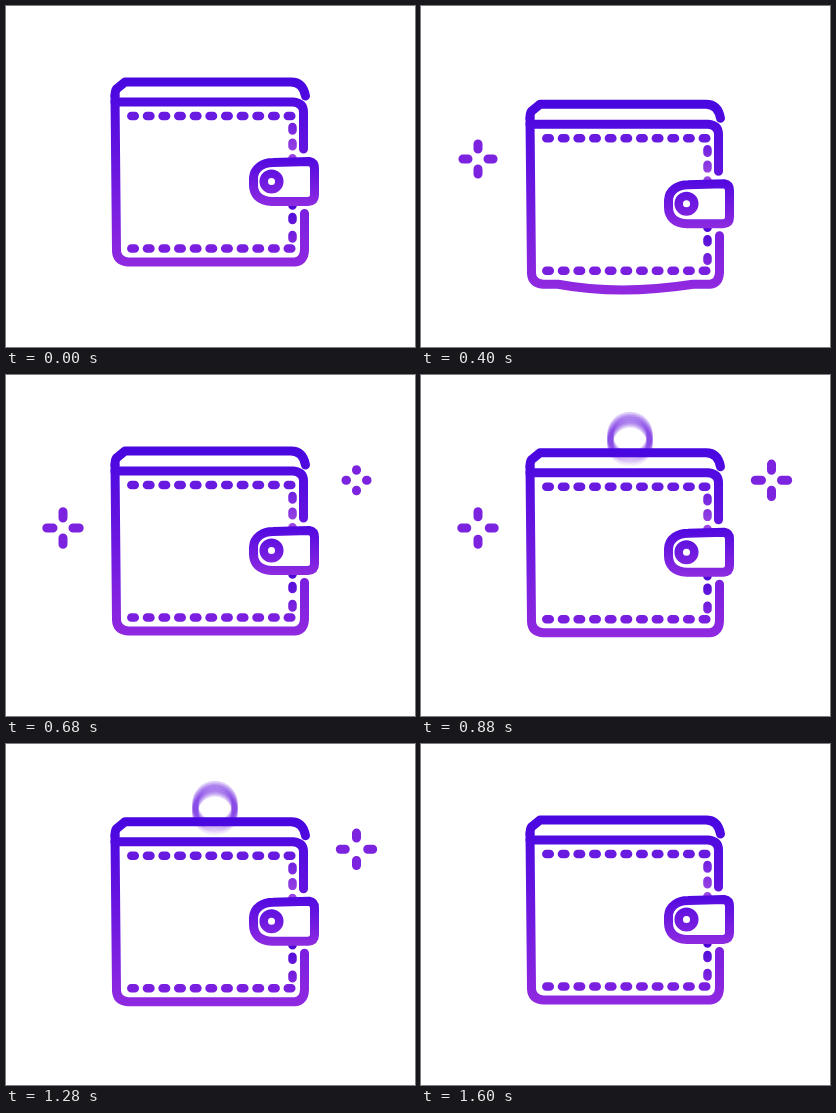
An HTML page that plays this animation: 409 px wide and 341 px high, repeating every 1760 ms.

```html
<!DOCTYPE html>
<html lang="en">
<head>
<meta charset="utf-8">
<title>Wallet</title>
<style>
  html, body { margin: 0; width: 100%; height: 100%; overflow: hidden; background: #fff; }
  svg { display: block; width: 100%; height: 100%; }
</style>
</head>
<body>
<svg viewBox="0 0 409 341" fill="none" stroke-linecap="round" stroke-linejoin="round">
  <defs>
    <linearGradient id="body" gradientUnits="userSpaceOnUse" x1="0" y1="72" x2="0" y2="260">
      <stop offset="0" stop-color="#4806e0"/><stop offset="1" stop-color="#9029e0"/>
    </linearGradient>
    <linearGradient id="clasp" gradientUnits="userSpaceOnUse" x1="0" y1="151" x2="0" y2="200">
      <stop offset="0" stop-color="#5008e0"/><stop offset="1" stop-color="#8e2be0"/>
    </linearGradient>
    <linearGradient id="seamTop" gradientUnits="userSpaceOnUse" x1="0" y1="112" x2="0" y2="148">
      <stop offset="0" stop-color="#6a1ae0"/><stop offset="1" stop-color="#9a46e2"/>
    </linearGradient>
    <linearGradient id="seamLow" gradientUnits="userSpaceOnUse" x1="0" y1="197" x2="0" y2="240">
      <stop offset="0" stop-color="#4505d6"/><stop offset="1" stop-color="#8528e0"/>
    </linearGradient>
    <linearGradient id="fade" gradientUnits="userSpaceOnUse" x1="0" y1="72" x2="0" y2="96">
      <stop offset="0" stop-color="#6a1ce0"/><stop offset="1" stop-color="#9a46e2" stop-opacity="0"/>
    </linearGradient>
  </defs>

  <g id="coin" stroke="url(#fade)" stroke-width="6" stroke-opacity=".2"></g>

  <g id="wallet" stroke="url(#body)" stroke-width="9">
    <path d="M299.500 90Q297 76 285 76H119L110.500 83Q109 85 109 90"/>
    <path d="M109 96H287Q297.500 97 297.500 106V143"/>
    <path id="shell"/>
    <g stroke-width="8.500" stroke-dasharray="3.500 12.150">
      <path stroke="#681ae0" d="M125.300 110H286"/>
      <path stroke="#7a1fe0" d="M125.300 242.500H286"/>
      <path stroke="url(#seamTop)" d="M286.500 121V156"/>
      <path stroke="url(#seamLow)" d="M286.500 196V200M286.500 211V214M286.500 229V233"/>
    </g>
    <path stroke="url(#clasp)" fill="#fff" d="M267 156.500L303 155.500Q308.500 156.500 308.500 162V189Q308.500 195 302 195.500H266C253 195 247.500 188 247.500 179V172C248 162 257 156.500 267 156.500Z"/>
    <circle stroke="url(#clasp)" stroke-width="8.500" cx="265.500" cy="175.500" r="7.800"/>
  </g>

  <path id="leftSpark" stroke="#7c23e0" transform="translate(57 153)"/>
  <path id="rightSpark" stroke="#7c23e0" transform="translate(350.500 105.300)"/>
</svg>
<script>
const LOOP = 1760, STEP = 40, DROPS = [200, 800, 1200], DROP_TIME = 400;
const $ = id => document.getElementById(id);
const ramp = (t, a, b) => Math.min(1, Math.max(0, (t - a) / (b - a)));
const smooth = (t, a, b) => { const u = ramp(t, a, b); return u * u * (3 - 2 * u); };
const pulse = (t, a, b) => Math.sin(Math.PI * ramp(t, a, b)) ** 2;

// Overlapping translucent rings give the falling coin its motion blur.
const rings = Array.from({ length: 7 }, () => {
  const ring = document.createElementNS('http://www.w3.org/2000/svg', 'circle');
  ring.setAttribute('cx', 209);
  ring.setAttribute('r', 19.8);
  return $('coin').appendChild(ring);
});

function drawSpark(el, t) {
  const inner = 10 + 6.2 * smooth(t, 800, 1080);
  const outer = Math.max(inner + .01, 10 + 6.2 * smooth(t, 240, 460));
  const width = 9 * ramp(t, 200, 270) * (1 - ramp(t, 1040, 1100));
  el.style.display = width > 0 ? '' : 'none';
  el.setAttribute('stroke-width', width);
  el.setAttribute('d', [[1, 0], [-1, 0], [0, 1], [0, -1]]
    .map(([x, y]) => `M${x * inner} ${y * inner}L${x * outer} ${y * outer}`).join(''));
}

function drawWallet(t) {
  const drop = pulse(t, 50, 390) * 23;
  const sag = pulse(t, 150, 340) * 10.5;
  const mid = 198 + 18 * ramp(t, 200, 240);
  $('wallet').setAttribute('transform', `translate(0 ${drop})`);
  $('shell').setAttribute('d', `M298.500 207.500V244Q298 255 289 256H272` +
    `Q${mid} ${256 + 2 * sag} 137 256H122Q111 255 110.500 245L109 90`);
}

function drawCoin(t) {
  $('coin').style.display = t >= 0 && t < 120 ? '' : 'none';
  const y = 2 + .62 * t + .002 * t * t;
  rings.forEach((ring, i) => ring.setAttribute('cy', y + (i - 3) * 1.6));
}

function frame(now) {
  const t = Math.floor(now % LOOP / STEP) * STEP;
  const start = DROPS.findLast(d => t >= d && t < d + DROP_TIME);
  const local = start === undefined ? -1 : t - start;
  drawCoin(local);
  drawWallet(local);
  drawSpark($('leftSpark'), t);
  drawSpark($('rightSpark'), t - 400);
  requestAnimationFrame(frame);
}
frame(performance.now());
</script>
</body>
</html>
```
